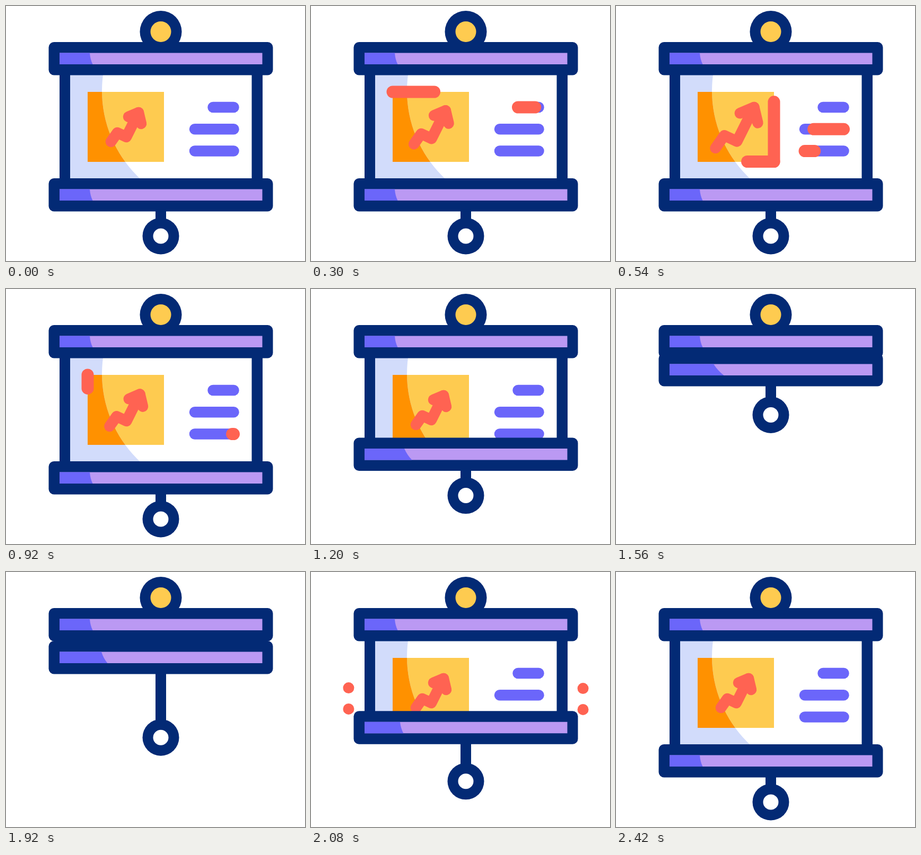
Write an HTML page with a canvas that moves like this. It is 564x481 px and loops after 3.4 s.

```html
<!DOCTYPE html>
<html lang="en">
<head>
<meta charset="utf-8">
<title>Presentation screen</title>
<style>
  html, body { margin: 0; width: 100%; height: 100%; overflow: hidden; background: #fff; }
  canvas { display: block; }
</style>
</head>
<body>
<canvas width="564" height="481"></canvas>
<script>
const ctx = document.querySelector('canvas').getContext('2d');
const LOOP = 3400;
const NAVY = '#032a75', PURPLE = '#6b66fa', LILAC = '#bb99f3', PALE = '#d2dcfb';
const ORANGE = '#ff9100', YELLOW = '#fecb50', RED = '#ff6352', WHITE = '#fff';
const BAR_OPEN = 325, BAR_CLOSED = 121, TRAVEL = BAR_OPEN - BAR_CLOSED;

// Segments are [x1, y1, x2, y2]
const FRAME = [[154, 162, 298, 162], [298, 162, 298, 293.5], [298, 293.5, 154, 293.5], [154, 293.5, 154, 162]];
const LINES = [[390.5, 191, 429.5, 191], [356, 232.3, 429.5, 232.3], [356, 273.6, 429.5, 273.6]];
const ARROW = [
  [[198, 256], [210, 239], [227, 247], [250, 201]],
  [[231, 209], [250, 201], [255, 222]]
];
// Time, then offsets of the upper and lower end of the lower bar's shade
const SHADE = [[1085, 0, 0], [1200, 18, 27], [1460, 26, 40], [1665, 26, 40], [1920, 22, 28], [2080, 10, 11], [2203, 0, 0]];

const part = (t, start, end) => Math.min(1, Math.max(0, (t - start) / (end - start)));
const ease = u => (1 - Math.cos(Math.PI * u)) / 2;

function rect(x, y, w, h, color, radius = 0) {
  ctx.fillStyle = color;
  ctx.beginPath();
  ctx.roundRect(x, y, w, h, radius);
  ctx.fill();
}

function disc(x, y, r, color) {
  ctx.fillStyle = color;
  ctx.beginPath();
  ctx.arc(x, y, r, 0, 2 * Math.PI);
  ctx.fill();
}

function stroke(points, width, color) {
  ctx.strokeStyle = color;
  ctx.lineWidth = width;
  ctx.lineCap = ctx.lineJoin = 'round';
  ctx.beginPath();
  points.forEach(([x, y]) => ctx.lineTo(x, y));
  ctx.stroke();
}

// Draws a dash whose length is a share of the whole route, u from 0 to 1
function runDash(segments, share, u) {
  const lengths = segments.map(([a, b, c, d]) => Math.hypot(c - a, d - b));
  const total = lengths.reduce((sum, n) => sum + n);
  const head = u * (1 + share) * total, tail = head - share * total;
  let before = 0;
  segments.forEach(([a, b, c, d], i) => {
    const from = part(tail, before, before + lengths[i]);
    const to = part(head, before, before + lengths[i]);
    const at = k => [a + (c - a) * k, b + (d - b) * k];
    if (to > from) stroke([at(from), at(to)], 23, RED);
    before += lengths[i];
  });
}

function shadeOffsets(t) {
  const i = SHADE.findIndex(key => key[0] > t);
  if (i < 1) return [0, 0];
  const [a, b] = [SHADE[i - 1], SHADE[i]], u = part(t, a[0], b[0]);
  return [1, 2].map(k => a[k] + (b[k] - a[k]) * u);
}

function bar(y, [top, bottom]) {
  rect(80.5, y, 423, 62.5, NAVY, 10);
  rect(101, y + 20.5, 382.5, 21.5, LILAC);
  const x1 = 158 + top, x2 = 163.5 + bottom;
  ctx.fillStyle = PURPLE;
  ctx.beginPath();
  ctx.moveTo(101, y + 20.5);
  ctx.lineTo(x1, y + 20.5);
  ctx.quadraticCurveTo((x1 + x2) / 2 - 1.8, y + 33, x2, y + 42);
  ctx.lineTo(101, y + 42);
  ctx.fill();
}

function shadeArea() {
  ctx.beginPath();
  ctx.rect(121, 120, 60, 220);
  ctx.rect(181, 120, 100, 220);
  ctx.arc(408, 160, 227, 0, 2 * Math.PI);
}

function board(t, bottom) {
  ctx.save();
  ctx.beginPath();
  ctx.rect(101, 110, 383, bottom - 110);
  ctx.clip();
  rect(101, 110, 383, 230, WHITE);
  rect(154, 162, 144, 132, YELLOW);

  // Left of the arc everything takes its darker tone
  ctx.save();
  shadeArea();
  ctx.clip('evenodd');
  rect(121, 120, 160, 220, PALE);
  rect(154, 162, 127, 132, ORANGE);
  ctx.restore();

  rect(101, 110, 20, 230, NAVY);
  rect(463.5, 110, 20.5, 230, NAVY);

  LINES.forEach(([a, b, c, d]) => stroke([[a, b], [c, d]], 20.5, PURPLE));
  runDash(FRAME, 0.296, ease(part(t, 100, 1034)));
  runDash(LINES, 0.406, ease(part(t, 100, 980)));

  const scale = 1 + 0.41 * ease(2 * part(t, 100, 1080));
  ARROW.forEach(points => stroke(
    points.map(([x, y]) => [224 + (x - 224) * scale, 226 + (y - 226) * scale]), 20.5, RED));
  ctx.restore();
}

function sparks(t) {
  if (t < 2030 || t >= 2420) return;
  const out = 1 - (1 - part(t, 1990, 2240)) ** 2;
  const reach = 180 + 69 * out;
  const radius = 10.5 * (1 - part(t, 2230, 2420));
  for (const side of [-1, 1])
    for (const row of [-1, 1])
      disc(292 + side * reach, 239 + side * 0.5 + row * reach * 0.09, radius, RED);
}

function draw(t) {
  const rise = ease(part(t, 1085, 1460));
  const drop = ease(part(t, 1877, 2203));
  const pull = ease(part(t, 1665, 2250));
  const bounce = 7.5 * Math.sin(Math.PI * part(t, 1460, 1665));
  const barY = BAR_OPEN - TRAVEL * (rise - drop);
  const ringY = 434 - TRAVEL * (rise - pull) + bounce;

  rect(0, 0, 564, 481, WHITE);
  sparks(t);
  board(t, barY + 10);
  rect(282, barY + 50, 20, Math.max(0, ringY - barY - 70), NAVY);
  disc(292, ringY, 34.5, NAVY);
  disc(292, ringY, 14.5, WHITE);
  bar(barY, shadeOffsets(t));
  bar(68, [0, 0]);
  disc(292, 48.5, 39.5, NAVY);
  disc(292, 48.5, 19.5, YELLOW);
}

const start = performance.now();
function tick() {
  draw((performance.now() - start) % LOOP);
  requestAnimationFrame(tick);
}
tick();
</script>
</body>
</html>
```
